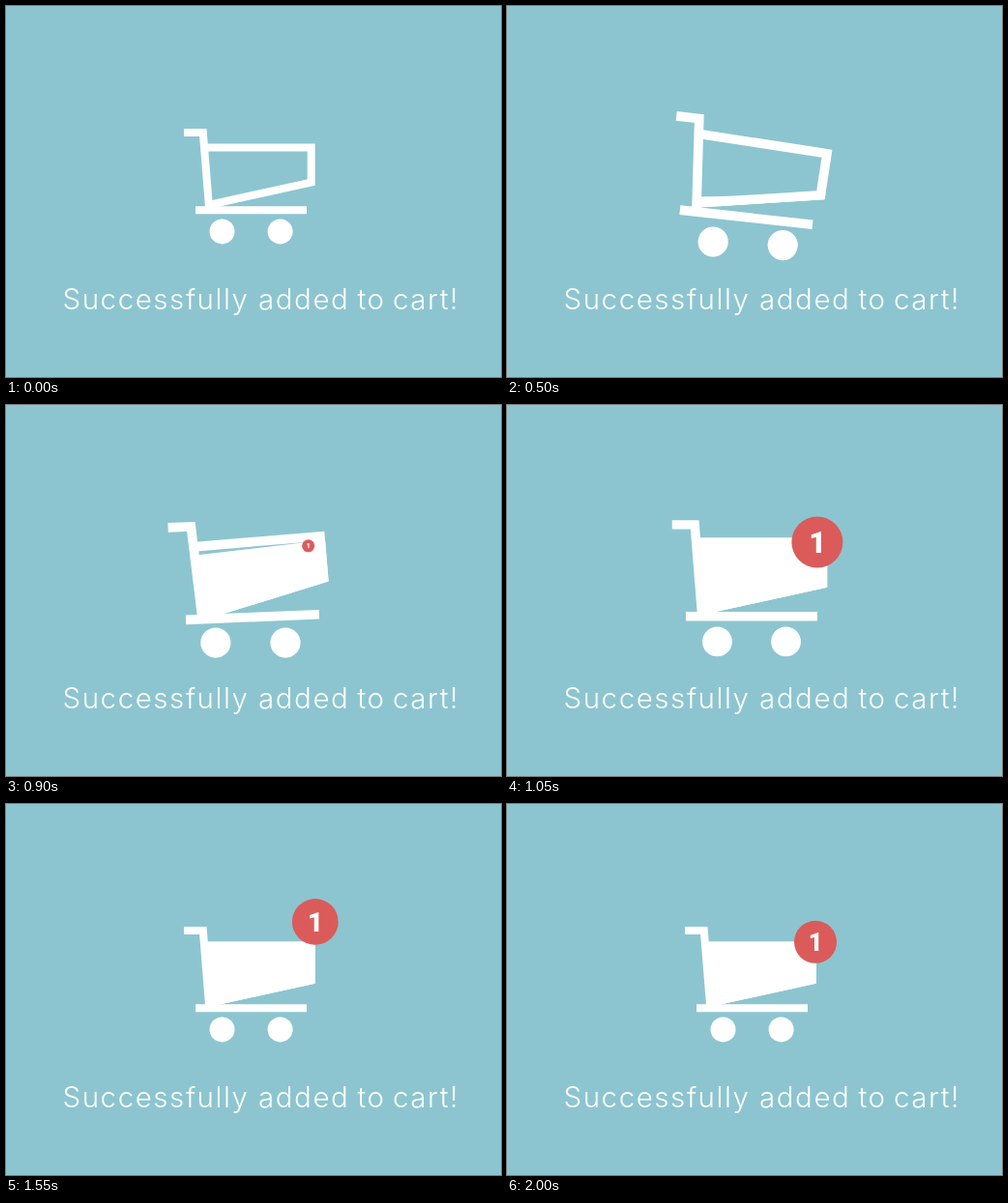
An HTML page for the animation above (2750 ms loop, 512 by 384 pixels).

```html
<!DOCTYPE html>
<html lang="en">
<head>
<meta charset="utf-8">
<title>Added to cart</title>
<style>
  html, body { margin: 0; width: 100%; height: 100%; overflow: hidden; background: #8cc5d0; }
  svg { display: block; width: 100vw; height: 100vh; }
  text { fill: #fff; }
  .message { font: 300 29.5px Inter, "Open Sans", sans-serif; letter-spacing: 1.55px; }
  .count { font: 900 25.6px Roboto, Arial, sans-serif; text-anchor: middle; }
  .line { fill: none; stroke: #fff; stroke-width: 8; stroke-miterlimit: 10; }
</style>
</head>
<body>
<svg viewBox="0 0 512 384">
  <g fill="#fff">
    <g id="wheels">
      <circle cx="223.5" cy="233.4" r="13"/>
      <circle cx="283.6" cy="233.4" r="13"/>
    </g>
    <g id="frame">
      <path class="line" d="M184 131H203.8L210 208"/>
      <path class="line" d="M196 211.2H311"/>
    </g>
    <g id="basket">
      <path class="line" d="M206 146.4H315.7V182.6L210 205.8"/>
      <polygon id="fill"/>
    </g>
  </g>
  <g id="badge">
    <circle r="22" fill="#db5b5b"/>
    <text class="count" x="0.2" y="9.2">1</text>
  </g>
  <text class="message" y="313.5">
    <tspan x="58.5">Successfully</tspan><tspan x="261">added</tspan><tspan x="363.5">to</tspan><tspan x="400">cart!</tspan>
  </text>
</svg>
<script>
const LOOP = 2750, STEP = 50, REST = 2000;
const PIVOT = { x: 256.6, y: 170 };

// Tracks are [time in ms, value] pairs, eased between neighbours.
const tracks = {
  scale: [[0, 1], [350, 1.2], [1000, 1.2], [1275, 1]],
  wheels: [[350, 0], [610, 4.6], [780, -3.4], [900, 0]],
  frame: [[350, 0], [610, 10.3], [800, -7.5], [960, 0]],
  basket: [[350, 0], [610, 14.2], [810, -10.5], [980, 0]],
  fill: [[350, 0], [1100, 1]],
  radius: [[805, 0], [1125, 30.8], [1200, 30.8], [1700, 22]],
  hop: [[1250, 0], [1420, 23.5], [2000, 0]]
};

const el = id => document.getElementById(id);
const mix = (a, b, u) => a + (b - a) * u;
const ease = u => u * u * (3 - 2 * u);

function at(track, t) {
  if (t <= track[0][0]) return track[0][1];
  for (let i = 1; i < track.length; i++) {
    const [t0, a] = track[i - 1], [t1, b] = track[i];
    if (t < t1) return mix(a, b, ease((t - t0) / (t1 - t0)));
  }
  return track[track.length - 1][1];
}

function draw(t) {
  const v = name => at(tracks[name], t);
  const { x, y } = PIVOT;

  for (const part of ["wheels", "frame", "basket"]) {
    el(part).setAttribute("transform",
      `translate(${x} ${y}) rotate(${v(part)}) scale(${v("scale")}) translate(${-x} ${-y})`);
  }

  // The top edge of the load rises from the basket floor to its rim.
  const level = v("fill");
  const left = mix(207, 142.4, level), right = mix(185.8, 142.4, level);
  const edge = mix(210.5, 206.5, level);
  el("fill").setAttribute("points", level
    ? `${edge},${left} 319.7,${right} 319.7,185.8 224,206.8 210.5,207` : "");

  const r = v("radius");
  el("badge").setAttribute("transform",
    `translate(${310 + 0.41 * r} ${147 - 0.19 * r - v("hop")}) scale(${r / 22})`);
  el("badge").style.display = r ? "" : "none";
}

const start = performance.now();
function tick() {
  const t = (performance.now() - start) % LOOP;
  draw(Math.min(REST, Math.floor(t / STEP) * STEP));
  requestAnimationFrame(tick);
}
tick();
</script>
</body>
</html>
```
